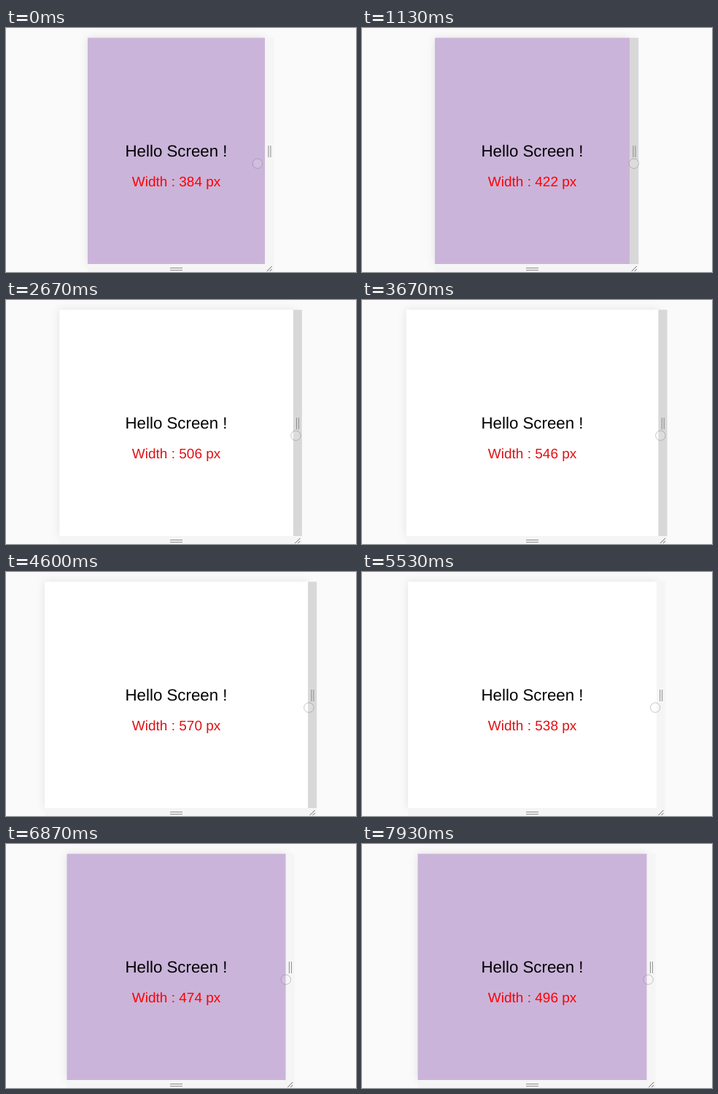
Write an HTML page that moves like this. It is 480x336 px and loops after 8 s.

```html
<!DOCTYPE html>
<html lang="en">
<head>
<meta charset="utf-8">
<title>Responsive width</title>
<style>
  html, body { margin: 0; width: 100%; height: 100%; overflow: hidden; background: #fafafa; }
  svg { display: block; width: 480px; height: 336px; }
  #panel { filter: drop-shadow(0 0 6px rgba(0, 0, 0, .1)); }
  text {
    font-family: "Liberation Sans", Arial, sans-serif;
    text-anchor: middle;
    text-rendering: geometricPrecision;
  }
  .grip { stroke: #8c8c8c; fill: none; }
  .corner { stroke: #666; }
</style>
</head>
<body>
<svg viewBox="0 0 480 336">
  <rect id="panel" y="13.5" height="311.5"/>
  <rect id="bottom" y="325" height="11" fill="#f5f5f5"/>
  <g id="side">
    <rect id="bar" y="13.5" width="12" height="311.5"/>
    <rect y="325" width="12" height="11" fill="#f5f5f5"/>
    <path class="grip" d="M4.7 162V178M7.7 162V178"/>
    <path class="grip corner" d="M2.5 335L9.5 328M6.5 335L9.5 332"/>
  </g>
  <path class="grip" d="M225 330.5H242M225 333.5H242"/>
  <text x="233.5" y="177" font-size="22.3">Hello Screen !</text>
  <text id="label" x="233.6" y="217.7" font-size="19"></text>
  <circle id="cursor" cy="186.7" r="6.7" fill="#fff" fill-opacity=".12" stroke="#777" stroke-opacity=".4"/>
</svg>
<script>
const DURATION = 8000, CENTER = 233.6, SCALE = 0.6335, BREAKPOINT = 500;
const CURSOR_LEAD = 170; // the panel edge trails the cursor by this many ms
const $ = id => document.getElementById(id);

// Turning points of the drag: [time in ms, width]
const drag = [
  [0, 384], [250, 337], [1870, 470], [4600, 570],
  [5000, 570], [7070, 470], [7330, 470], [DURATION, 498]
];
const easeOut = u => 1 - (1 - u) ** 1.3;

function widthAt(time) {
  const next = drag.findIndex(([t]) => t > time);
  if (next < 0) return drag.at(-1)[1];
  const [t0, from] = drag[next - 1], [t1, to] = drag[next];
  return from + (to - from) * easeOut((time - t0) / (t1 - t0));
}

const rightEdge = width => CENTER + width * SCALE / 2;

function set(id, attributes) {
  for (const name in attributes) $(id).setAttribute(name, attributes[name]);
}

function draw(time) {
  const width = 2 * Math.round(widthAt(time) / 2);
  const shown = width * SCALE;
  const left = CENTER - shown / 2;
  const narrow = width <= BREAKPOINT;
  const barHovered = time > 450 && time < 5060;

  set("panel", { x: left, width: shown, fill: narrow ? "#cbb4da" : "#fff" });
  set("bottom", { x: left, width: shown });
  set("side", { transform: `translate(${rightEdge(width)})` });
  set("bar", { fill: barHovered ? "#d8d8d8" : "#f5f5f5" });
  set("label", { fill: narrow ? "#f00" : "#e01014" });
  set("cursor", { cx: rightEdge(widthAt(time + CURSOR_LEAD)) + 1.2 });
  $("label").textContent = `Width : ${width} px`;
}

const start = performance.now();
function frame() {
  draw((performance.now() - start) % DURATION);
  requestAnimationFrame(frame);
}
frame();
</script>
</body>
</html>
```
